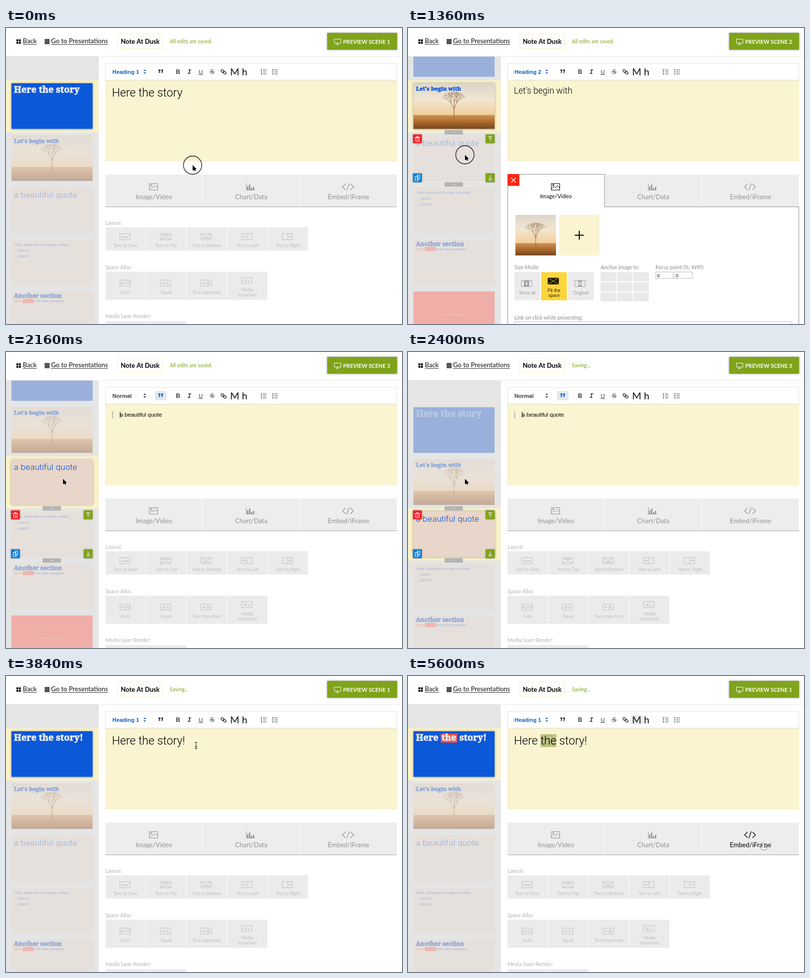
These frames come from a looping animation (800x600 px, 5.68 s). An HTML page with a canvas:

```html
<!DOCTYPE html>
<html lang="en">
<head>
<meta charset="utf-8">
<title>Slide editor</title>
<style>
html, body { margin: 0; width: 100%; height: 100%; overflow: hidden; background: #fff; }
canvas { display: block; }
</style>
</head>
<body>
<canvas width="800" height="600"></canvas>
<script>
const ctx = document.querySelector('canvas').getContext('2d');
const LOOP = 5680, STEP = 80, PITCH = 105.5, SLIDE_W = 164, SLIDE_H = 92.5;
const LATO = 'Lato, sans-serif', ARIAL = '"Liberation Sans", sans-serif';
const SLAB = '"Noto Serif", serif', LIGHT = 'Roboto, sans-serif', THIN = 'Inter, sans-serif';
const GREEN = '#7fa31a', BLUE = '#0b58d8', CREAM = '#faf4d1', RED = '#ff5046', YELLOW = '#fdd63c', TILE = '#ebebeb';

// Story: when scenes open, edits happen and the pointer rests.
const OPEN_SECOND = 720, OPEN_THIRD = 1440, OPEN_FIRST = 2880;
const TYPED = 3680, SELECTED = 4400, MARKED = 5040, TAB_HOVER = 5520;
const SAVES = [2320, OPEN_FIRST, TYPED + STEP, MARKED + STEP], SAVE_TIME = 500;
const STOPS = [
  { x: 377, y: 278, from: -80, to: 0, click: true },
  { x: 115, y: 257, from: 560, to: 1280, click: true },
  { x: 115, y: 257, from: 1280, to: 2560, click: true },
  { x: 140, y: 165, from: 2800, to: 2880, click: true },
  { x: 352, y: 178, from: 3040, to: 3040 },
  { x: 384, y: 140, from: 3200, to: 4000, click: true },
  { x: 308, y: 140, from: 4320, to: 4640, click: true },
  { x: 461, y: 89, from: 4960, to: 5360, click: true },
  { x: 718, y: 339, from: 5600, to: LOOP }
];

function glide(t, from, to) {
  const u = Math.max(0, Math.min(1, (t - from) / (to - from)));
  return u * u * (3 - 2 * u);
}
function pointerAt(t) {
  const next = STOPS.find(s => s.to >= t), prev = STOPS[STOPS.indexOf(next) - 1] || next;
  const e = next === prev ? 1 : glide(t, prev.to, next.from);
  return { x: prev.x + (next.x - prev.x) * e, y: prev.y + (next.y - prev.y) * e };
}
const scrollAt = t => PITCH * (glide(t, 640, 960) + glide(t, 1360, 1680) - 2 * glide(t, 1920, 2400));
const sceneAt = t => t < OPEN_SECOND || t >= OPEN_FIRST ? 1 : t < OPEN_THIRD ? 2 : 3;

// Hover follows scrolling late and fades over three samples.
function hoverStrength(index, t) {
  const hits = [0, 60, 120].filter(ago => {
    const p = pointerAt(Math.max(0, t - ago));
    return p.x < 188 && Math.floor((p.y - 106 + scrollAt(t - ago - 180)) / PITCH) === index;
  });
  return (hits.length / 3) ** 2;
}

function rect(x, y, w, h, fill) { ctx.fillStyle = fill; ctx.fillRect(x, y, w, h); }
function frame(x, y, w, h, color, dash = []) {
  ctx.strokeStyle = color; ctx.lineWidth = 1; ctx.setLineDash(dash);
  ctx.strokeRect(x + .5, y + .5, w - 1, h - 1);
  ctx.setLineDash([]);
}
function line(color, width, ...points) {
  ctx.strokeStyle = color; ctx.lineWidth = width;
  ctx.beginPath();
  for (const [x, y] of points) ctx.lineTo(x, y);
  ctx.stroke();
}
function poly(fill, ...points) {
  ctx.fillStyle = fill;
  ctx.beginPath();
  for (const [x, y] of points) ctx.lineTo(x, y);
  ctx.closePath(); ctx.fill();
}
function text(str, x, y, font, color, align = 'left') {
  ctx.font = font; ctx.fillStyle = color; ctx.textAlign = align;
  ctx.fillText(str, x, y);
  return ctx.measureText(str).width;
}
function slab(str, x, y, size, color) {
  const w = text(str, x, y, `900 ${size}px ${SLAB}`, color);
  ctx.strokeStyle = color; ctx.lineWidth = size / 20;
  ctx.strokeText(str, x, y);
  return w;
}
function at(x, y, draw, alpha = 1) {
  ctx.save(); ctx.translate(x, y); ctx.globalAlpha *= alpha; draw(); ctx.restore();
}
function shadow(color, blur, draw) {
  ctx.save(); ctx.shadowColor = color; ctx.shadowBlur = blur; draw(); ctx.restore();
}
function gradient(from, to, ...colors) {
  const g = ctx.createLinearGradient(0, from, 0, to);
  colors.forEach((c, i) => g.addColorStop(i / (colors.length - 1), c));
  return g;
}

function branch(x, y, angle, length, depth) {
  const x2 = x + Math.cos(angle) * length, y2 = y + Math.sin(angle) * length;
  line('#80593999', .4 + depth * .3, [x, y], [x2, y2]);
  if (depth) for (const turn of [-.42, .04, .38]) branch(x2, y2, angle + turn, length * .7, depth - 1);
}
function photo(x, y, w, h) {
  ctx.save();
  ctx.beginPath(); ctx.rect(x, y, w, h); ctx.clip();
  ctx.translate(x + w / 2, y); ctx.scale(h / 92, h / 92);
  rect(-90, 0, 180, 66, gradient(0, 66, '#dcd5c9', '#f2e6d1', '#f1cd98'));
  rect(-90, 64, 180, 30, gradient(64, 94, '#cf9453', '#a9672c', '#6a421f'));
  branch(0, 72, -Math.PI / 2, 20, 4);
  ctx.restore();
}

const slides = [
  t => {
    const white = '#e9ebef', size = 18.3;
    rect(0, 0, SLIDE_W, SLIDE_H, BLUE);
    let x = 5 + slab('Here ', 5, 19, size, white);
    if (t >= MARKED) {
      const w = ctx.measureText('the').width + 3;
      rect(x, 5, w, 18, RED);
      slab('the', x + 1.5, 19, size, white);
      slab(' story!', x + w, 19, size, white);
    } else slab('the story' + (t > TYPED ? '!' : ''), x, 19, size, white);
  },
  () => { photo(0, 0, SLIDE_W, SLIDE_H); slab("Let's begin with", 5, 15, 11.4, BLUE); },
  () => text('a beautiful quote', 5, 21, '300 16.4px ' + THIN, BLUE),
  () => ['Then, some text to make a context', '  –  point A', '  –  point B'].forEach((row, i) =>
    text(row, 5, 13 + 11.8 * i, (i ? 6.2 : 6.8) + 'px ' + THIN, BLUE)),
  () => {
    slab('Another section', 5, 13, 12, BLUE);
    text('More', 5, 22, '6.5px ' + THIN, RED);
    rect(23, 15.5, 22, 8, RED);
    text('WOW!', 34, 22, '6.2px ' + THIN, '#fff', 'center');
    text('text with variations', 47, 22, '6.8px ' + THIN, BLUE);
  },
  () => {
    rect(0, 0, SLIDE_W, SLIDE_H, RED);
    text('End with a link', 82, 49, '6.8px ' + THIN, '#fff', 'center');
    rect(95, 50, 11, .6, '#fff');
  },
  () => {}
];

function slideTools() {
  const button = (x, y, fill, draw) => at(x, y, () => {
    shadow('#0006', 3, () => rect(-9, -9, 18, 18, fill));
    draw();
  });
  const arrow = flip => () => {
    ctx.scale(1, flip);
    line('#fff', 1, [-4, -4.5], [4, -4.5]);
    line('#fff', 1, [0, 5], [0, -3]);
    line('#fff', 1, [-3, 0], [0, -3], [3, 0]);
  };
  for (const y of [-6, 99.5]) {
    rect(74, y - 4.5, 37, 9, '#b4b4b4');
    text('+', 92.5, y + 2.5, '7px ' + LATO, '#fff', 'center');
  }
  button(19, 7, '#f8232b', () => {
    frame(-4, -3, 8, 9, '#fff'); frame(-2, -5, 4, 3, '#fff');
    line('#fff', 1, [-5.5, -2.5], [5.5, -2.5]);
    line('#fff', 1, [0, -1], [0, 4]);
  });
  button(19, 86, '#0c82dd', () => { frame(-1, -6, 6, 9, '#fff'); frame(-5, -3, 7, 9, '#fff'); });
  button(166, 7, GREEN, arrow(1));
  button(166, 86, GREEN, arrow(-1));
}

function sidebar(t, scene) {
  ctx.save();
  ctx.beginPath(); ctx.rect(0, 58, 188, 542); ctx.clip();
  rect(0, 58, 187.5, 542, '#e4e5e4');
  const top = i => 112 + PITCH * i - scrollAt(t);
  slides.forEach((draw, i) => {
    const selected = i === scene - 1;
    if (selected) {
      rect(0, top(i) - 6, 187.5, PITCH, '#faf2c9');
      shadow('#0005', 5, () => rect(11, top(i), SLIDE_W, SLIDE_H, '#ddd'));
    }
    at(11, top(i), () => { rect(0, 0, SLIDE_W, SLIDE_H, '#e9d6ca'); draw(t); }, selected ? 1 : .35);
  });
  slides.forEach((_, i) => at(0, top(i), slideTools, hoverStrength(i, t)));
  ctx.restore();
}

function header(t, scene) {
  for (let i = 0; i < 4; i++) {
    rect(21 + i % 2 * 5, 23 + (i >> 1) * 5, 4, 4, '#111');
    rect(78, 22.5 + i * 2.7, 10, 1.9, '#111');
  }
  for (const [label, x] of [['Back', 34], ['Go to Presentations', 91]])
    rect(x, 33, text(label, x, 31, '13.2px ' + LATO, '#111'), 1, '#333');
  frame(225, 12, 92, 30, '#f3dc98', [2, 2]);
  text('Note At Dusk', 271, 32, 'bold 13px ' + LATO, '#000', 'center');
  const saving = SAVES.some(s => t >= s && t < s + SAVE_TIME);
  text(saving ? 'Saving...' : 'All edits are saved.', 331, 31, '10.5px ' + LATO, GREEN);
  shadow('#0007', 4, () => rect(649, 10, 141, 34, GREEN));
  frame(663, 22, 14, 9, '#fff');
  rect(669, 31, 1, 2, '#fff'); rect(666, 33, 7, 1, '#fff');
  text('PREVIEW SCENE ' + scene, 681, 32, 'bold 11px ' + LATO, '#fff');
  rect(0, 57, 800, 1, '#e8e8e8');
}

function toolbar(t, scene) {
  const dark = '#3d3d3d', quoting = scene === 3;
  const blueIf = on => on ? '#0b62c4' : dark;
  rect(201, 71, 589, 35, '#fff'); frame(201, 71, 589, 35, '#e2e2e2');
  text(['Heading 1', 'Heading 2', 'Normal'][scene - 1], 215, 93, 'bold 11.3px ' + ARIAL, blueIf(!quoting));
  for (const d of [-1, 1])
    poly(blueIf(!quoting), [277.5, 88.5 + d * 1.5], [280.3, 88.5 + d * 4.5], [283, 88.5 + d * 1.5]);
  if (quoting) rect(301, 79, 23, 19, '#e6e7e9');
  text('”', 312.5, 102, 'bold 26px ' + ARIAL, blueIf(quoting), 'center');
  ['bold 12px ' + ARIAL, 'italic bold 13px "Liberation Mono", monospace', '11.5px ' + ARIAL, '12px ' + ARIAL]
    .forEach((font, i) => text('BIUS'[i], 347.5 + 23 * i, 93, font, dark, 'center'));
  rect(388.5, 94, 9.5, 1, dark); rect(411.5, 88.5, 10, 1, dark);
  at(439.5, 89, () => {
    ctx.rotate(.7); ctx.strokeStyle = dark; ctx.lineWidth = 1.4;
    for (const x of [-2.7, 2.7]) { ctx.beginPath(); ctx.ellipse(x, 0, 3.4, 2.4, 0, 0, 7); ctx.stroke(); }
  });
  if (t >= MARKED) rect(451, 79, 23, 19, '#e8e8e8');
  text('M', 462, 96, '20px ' + LATO, '#111', 'center');
  text('h', 482, 96, '20px ' + LATO, '#111', 'center');
  for (const x of [515, 538]) for (const y of [84.5, 88.5, 92.5]) {
    rect(x, y - .5, 2, 2, dark);
    rect(x + 4, y, 7, 1, dark);
  }
}

function editor(t, scene) {
  rect(201, 106, 589, 164, CREAM); frame(201, 106, 589, 164, '#e9e3bc', [1, 1]);
  if (scene === 2) text("Let's begin with", 214, 133, '300 17.5px ' + LIGHT, '#000');
  if (scene === 3) {
    rect(214, 120, 3, 15, '#c9ccc8');
    rect(230, 121, 1, 12, '#000');
    text('a beautiful quote', 230, 131, '11.5px ' + ARIAL, '#000');
  }
  if (scene > 1) return;
  const font = '300 23.2px ' + LIGHT;
  ctx.font = font;
  if (t >= SELECTED) rect(214 + ctx.measureText('Here ').width, 118, ctx.measureText('the').width, 26, t >= MARKED ? '#bcc183' : '#c6c7cc');
  text('Here the story' + (t >= TYPED ? '!' : ''), 214, 139, font, '#000');
}

const tabIcons = [
  color => {
    frame(-9, -7, 18, 14, color);
    line(color, 1, [-8, 4], [-3, -1], [0, 2], [4, -3], [8, 2]);
    frame(-6, -5, 3, 3, color);
  },
  color => {
    rect(-9, -7, 1, 14, color); rect(-9, 6, 17, 1, color);
    for (let i = 0; i < 4; i++) rect(-7 + i * 4, 6, 2.5, -7 - 4 * Math.sin(i * 2), color);
  },
  color => {
    for (const d of [-1, 1]) line(color, 1.3, [d * 5, -6], [d * 11, 0], [d * 5, 6]);
    line(color, 1.3, [2.5, -7], [-2.5, 7]);
  }
];
function tabs(t, scene) {
  ['Image/Video', 'Chart/Data', 'Embed/iFrame'].forEach((label, i) => {
    const x = 201 + 196.5 * i, open = scene === 2 && i === 0;
    const color = open || (i === 2 && t >= TAB_HOVER) ? '#000' : '#929292';
    rect(x, 297, 195.5, 65, open ? '#fff' : '#ededed');
    text(label, x + 98, open ? 345 : 346.5, (open ? 11.3 : 13) + 'px ' + LATO, color, 'center');
    at(Math.round(x + 96.5), 322, () => tabIcons[i](color));
  });
  if (scene !== 2) return rect(201, 362, 589, 1, '#a2a2a2');
  line('#8c8c8c', 1, [201.5, 600], [201.5, 296.5], [397, 296.5], [397, 362.5], [789.5, 362.5], [789.5, 600]);
  rect(201, 296, 24, 24, '#fb2817');
  for (const d of [-4.5, 4.5]) line('#fff', 1.6, [213 - d, 304], [213 + d, 313]);
}

function tile(label, x, y, w, h, color, bg, drawIcon) {
  rect(x, y, w, h, bg);
  const rows = label.split('\n'), tall = h > 50;
  rows.forEach((row, i) => text(row, x + w / 2, y + h - (rows[1] ? 17 - 9.5 * i : tall ? 12.5 : 7.5), '9px ' + LATO, color, 'center'));
  at(Math.round(x + w / 2) - 1.5, y + (rows[1] ? 18 : tall ? 23 : 19), () => {
    frame(-11, -6.5, 22, 13, color);
    drawIcon(color);
  });
}
function options() {
  const label = (s, y) => text(s, 201, y, '10.5px ' + LATO, '#b2b2b2');
  const row = (names, y, h, icon) => names.forEach((name, i) =>
    tile(name, 201 + 82 * i, y, 81, h, '#bdbdbd', TILE, color => icon(i, color)));

  label('Layout', 399);
  row(['Text to Over', 'Text to Top', 'Text to Bottom', 'Text to Left', 'Text to Right'], 404, 47, (i, color) => {
    const side = i % 2 ? -1 : 1;
    if (i < 3) rect(-7, i && side * 3 - 1, 14, 1.5, color);
    if (i === 1 || i === 2) line(color, 1, [-10, -side * 6], [0, 0], [10, -side * 6]);
    if (i > 2) { rect(0, -6, 1, 12, color); rect(side * 5 - 3, -1, 6, 1.5, color); }
  });
  label('Space Alloc', 488.5);
  row(['Auto', 'Equal', 'Text important', 'Media\nimportant'], 494, 57, (i, color) =>
    text(['AUTO', '⊠ A', '▪ A', '⊠ ▴'][i], 0, i === 2 ? 4 : 2.5, (i === 2 ? 11 : 7) + 'px ' + LATO, color, 'center'));
  label('Media layer Render:', 587.5);
  row(['', ''], 594, 20, () => {});
}

function imagePanel() {
  const label = (s, x, y) => text(s, x, y, '10.5px ' + LATO, '#8a8a8a');
  const input = (x, y, w, value) => {
    frame(x, y, w, 14, '#b8b8b8');
    text(value, x + 3, y + 11, '9.5px ' + ARIAL, '#000');
  };
  photo(217, 379, 82, 82);
  rect(305, 379, 82, 82, CREAM);
  rect(337, 419, 18, 2, '#000'); rect(345, 411, 2, 18, '#000');
  label('Size Mode:', 215, 489); label('Anchor image to:', 389, 489); label('Focus point (%, WIP):', 500, 489);
  const crop = width => color => { rect(-width, -6, width * 2, 12, color); rect(-1.5, -3, 3, 6, '#eee'); };
  tile('Show all', 215, 495, 52, 57, '#999', TILE, crop(5));
  tile('Fit the\nspace', 269, 495, 52, 57, '#1a1500', YELLOW, color => {
    rect(-11, -6.5, 22, 13, color);
    for (const d of [-6, 6]) line(YELLOW, .8, [-10, d], [10, -d]);
  });
  tile('Original', 323, 495, 52, 57, '#999', TILE, crop(3));
  for (let i = 0; i < 9; i++) rect(389 + i % 3 * 33, 495 + Math.floor(i / 3) * 20.3, 31.5, 18.5, '#e9e9e9');
  input(500, 494, 36, '0'); input(538, 494, 37, '0');
  label('Link on click while presenting:', 215, 591);
  input(215, 595, 561, '');
}

const cursors = {
  arrow() {
    line('#fff', 4, [3, 7], [5.5, 12.5]);
    ctx.lineWidth = 1.5; ctx.strokeStyle = '#fff';
    poly('#000', [0, 0], [0, 11], [8, 8]); ctx.stroke();
    line('#000', 2, [3, 7], [5.3, 12]);
    poly('#000', [0, 0], [0, 11], [8, 8]);
  },
  beam() {
    rect(-.5, -6, 1, 13, '#222');
    for (const y of [-6, 3, 7]) rect(-2.5, y, 5, 1, '#222');
  },
  hand() {
    const part = (x, y, w, h) => {
      ctx.beginPath(); ctx.roundRect(x, y, w, h, 2);
      ctx.fillStyle = '#fff'; ctx.strokeStyle = '#111'; ctx.lineWidth = 1;
      ctx.stroke(); ctx.fill();
    };
    part(-4, 5, 10, 8); part(-2, -1, 3, 10);
    for (const x of [2, 4]) rect(x, 6, .8, 3, '#111');
  }
};
function pointer(t) {
  const { x, y } = pointerAt(t);
  if (STOPS.some(s => s.click && t >= s.from && t < s.from + 2 * STEP)) {
    ctx.beginPath(); ctx.arc(x, y, 18.5, 0, 7);
    ctx.strokeStyle = '#111'; ctx.lineWidth = 1.3; ctx.stroke();
  }
  const onText = t > 3120 && y > 106 && y < 270;
  const onButton = t > 4880 && (y < 106 || t >= TAB_HOVER);
  at(x, y, cursors[onButton ? 'hand' : onText ? 'beam' : 'arrow']);
}

function render(t) {
  const scene = sceneAt(t);
  rect(0, 0, 800, 600, '#fff');
  header(t, scene);
  sidebar(t, scene);
  toolbar(t, scene);
  editor(t, scene);
  tabs(t, scene);
  if (scene === 2) imagePanel(); else options();
  pointer(t);
}

function loop() {
  render(Math.floor(performance.now() % LOOP / STEP) * STEP);
  requestAnimationFrame(loop);
}
loop();
</script>
</body>
</html>
```
